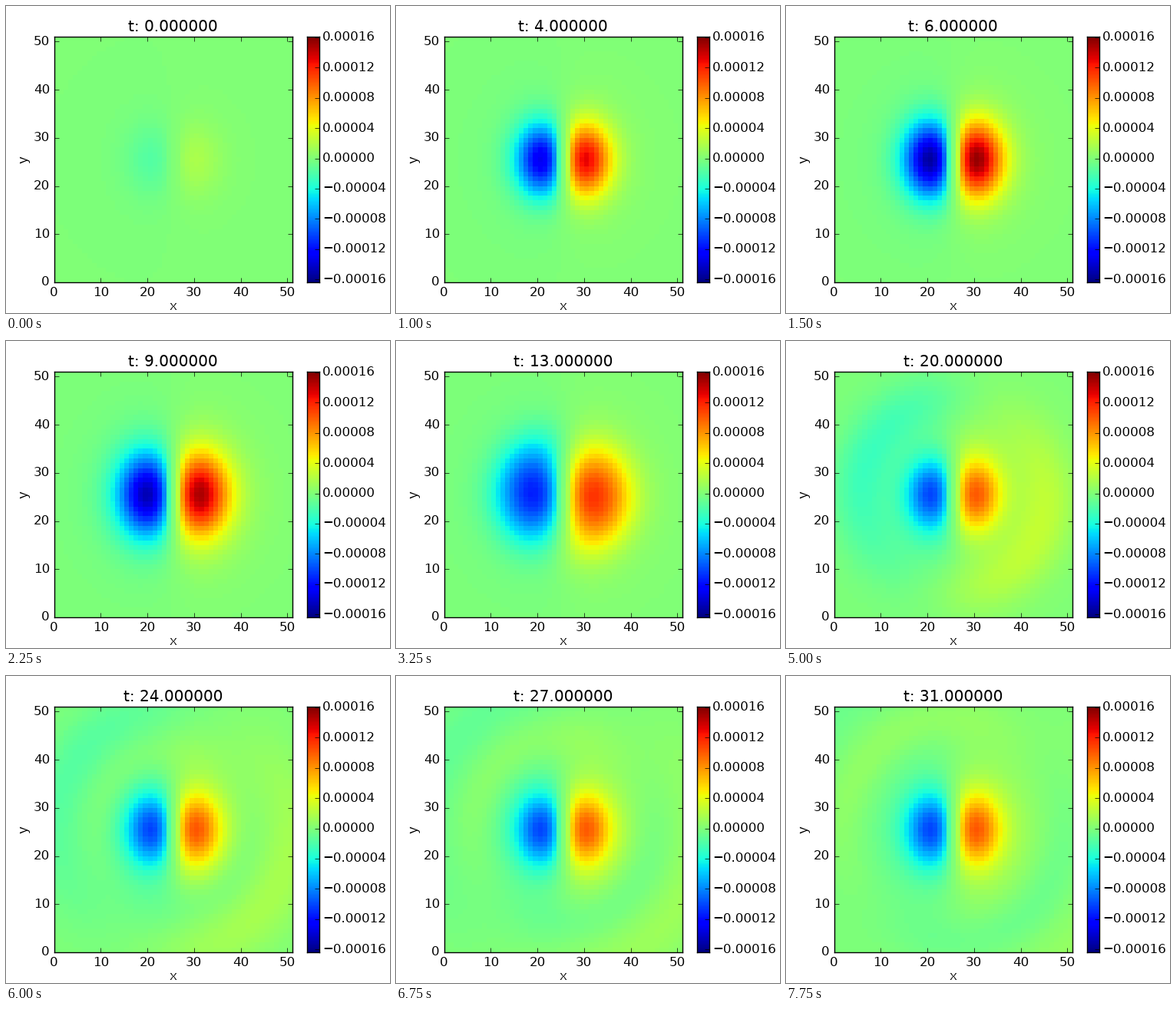
A matplotlib script that plays this animation: 500 px wide and 400 px high, repeating every 8000 ms.

```python
import numpy as np
import matplotlib.pyplot as plt
from matplotlib.animation import FuncAnimation

plt.style.use("classic")
plt.rcParams["font.family"] = "DejaVu Sans"
plt.rcParams["text.hinting"] = "native"

N = 51
FRAMES = 32
VMIN, VMAX = -1.64e-4, 1.61e-4

# Cell offsets from the middle of the grid
offset = np.arange(N) - N // 2
dx, dy = np.meshgrid(offset, offset)
radius = np.hypot(dx, dy)

# Weakened seam between the two lobes
seam = 1 - 0.6 * np.exp(-(dx / 1.4) ** 4 - (dy / 10) ** 2)
halo = np.tanh(dx / 6) * np.exp(-(radius / 18) ** 2)


def ring(r, width, turn):
    """Wave crest of radius r with opposite lobes, turned by some degrees."""
    a = np.radians(turn)
    lobes = (dx * np.cos(a) + dy * np.sin(a)) / np.sqrt(radius**2 + 4)
    return lobes * np.exp(-((radius - r) / width) ** 2)


def field(t):
    age = t + 1.5
    # The lobes overshoot, then settle like a damped oscillator
    swing = 1 - np.exp(-(age / 12) ** 2) * np.cos(0.383 * age)
    size = 4.8 + np.exp(-((t - 9) / 2.5) ** 2)
    x, y = dx / size, dy / (1.1 * size)
    core = 0.9 * swing * x * np.exp((1 - x**2 - y**2) / 2)
    tail = 0.2 * (1 - np.exp(-age / 12)) * halo

    # Two crests leave the middle one after the other
    r1 = max(0, 1.4 * (t - 5.8))
    r2 = max(0, 1.05 * (t - 9))
    q = r1 / 9
    front = 1.14 * q**2 / (1 + q**4) * ring(r1, 6, -8 - 2 * (t - 13))
    back = 0.11 * (1 - np.exp(-(r2 / 14) ** 4)) * ring(r2, 5, -42)
    return 1e-4 * (seam * (core + front) + tail - back)


fig = plt.figure(figsize=(5, 4), dpi=100, facecolor="white")
style = dict(cmap="jet", vmin=VMIN, vmax=VMAX, origin="lower",
             aspect="auto", interpolation="nearest")

ax = fig.add_axes([0.125, 0.1, 0.62, 0.8])
image = ax.imshow(field(0), extent=(0, N, 0, N), **style)
ax.set_xticks(range(0, N, 10))
ax.set_yticks(range(0, N, 10))
ax.set_xlim(0, N)
ax.set_ylim(0, N)
ax.tick_params(axis="x", pad=3.4)
ax.set_xlabel("x", labelpad=1)
ax.set_ylabel("y", labelpad=3)
title = ax.set_title("")

bar = fig.add_axes([0.78375, 0.1, 0.032, 0.8])
ramp = np.linspace(VMIN, VMAX, 256)[:, None]
bar.imshow(ramp, extent=(0, 1, VMIN, VMAX), **style)
levels = np.arange(-4, 5) * 4e-5
bar.set_xticks([])
bar.set_yticks(levels)
bar.set_yticklabels([f"{v:.5f}".replace("-", "\u2212") for v in levels])
bar.tick_params(axis="y", left=False, right=True, labelleft=False,
                labelright=True, pad=2.8)
bar.set_ylim(VMIN, VMAX)


def update(t):
    image.set_data(field(t))
    title.set_text(f"t: {t:.6f}")
    return image, title


anim = FuncAnimation(fig, update, frames=FRAMES, interval=250, repeat=True,
                     repeat_delay=0, blit=False)
plt.show()
```
